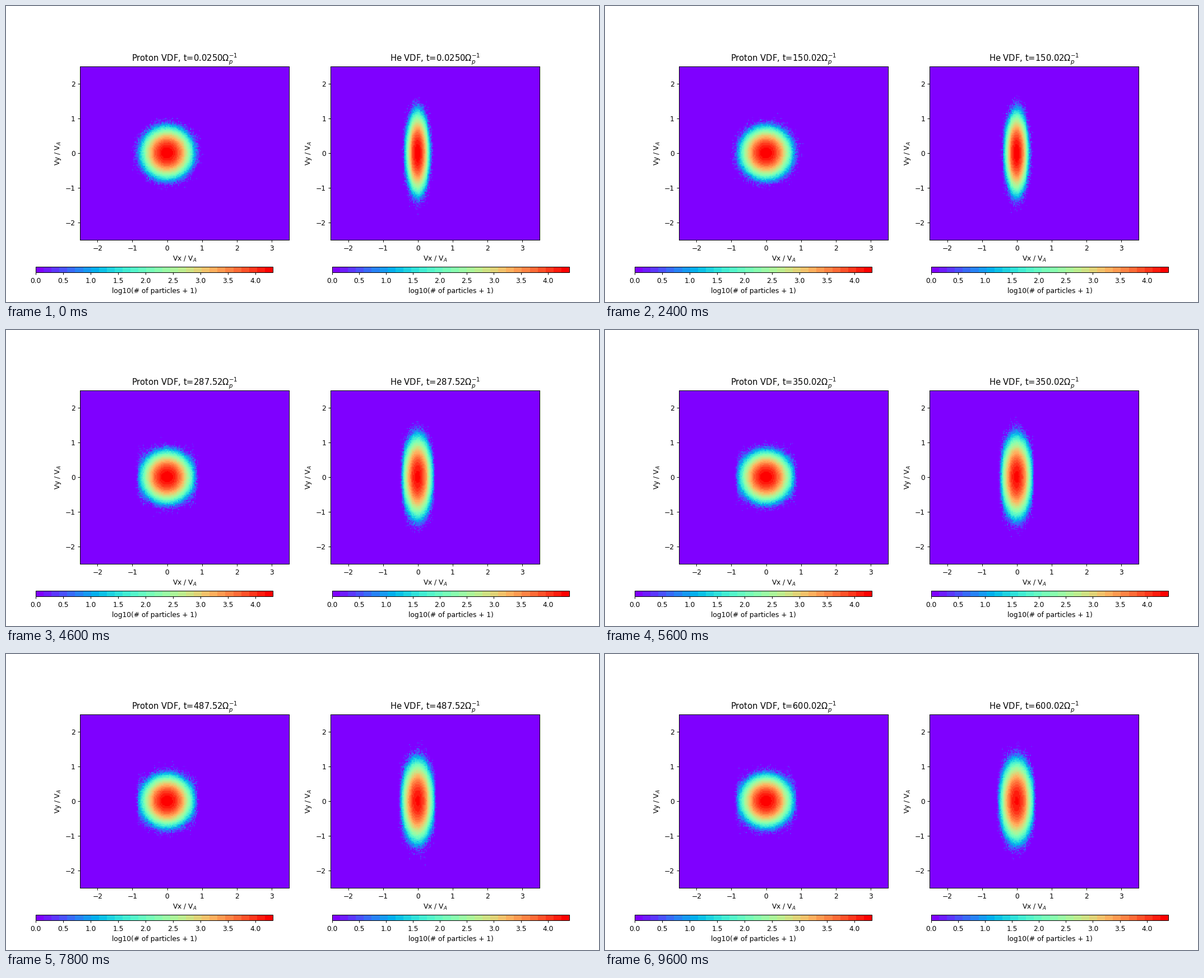
Write a matplotlib script that moves like this. It is 1058x529 px and loops after 9.8 s.

```python
import matplotlib.pyplot as plt
import numpy as np
from matplotlib.animation import FuncAnimation

plt.rcParams["font.family"] = "DejaVu Sans"

FRAMES, INTERVAL = 49, 200
BINS = 200
X_RANGE, Y_RANGE = (-2.5, 3.5), (-2.5, 2.5)


def bin_centres(limits):
    edges = np.linspace(*limits, BINS + 1)
    return (edges[1:] + edges[:-1]) / 2


VX, VY = np.meshgrid(bin_centres(X_RANGE), bin_centres(Y_RANGE))


def gauss(v, sigma):
    return np.exp(-0.5 * (v / sigma) ** 2)


def wall(v, edge):
    """Steep cut-off that flattens the sides of a distribution."""
    return np.exp(-np.abs(v / edge) ** 16)


def growth(t):
    """Saturating instability, then a slow linear drift."""
    onset = 1 / (1 + np.exp(-(t - 230) / 16))
    drift = np.clip((t - 287) / 313, 0, 1)
    return onset, drift


def proton_density(t):
    onset, drift = growth(t)
    core = 20000 * gauss(VX, 0.206) * gauss(VY, 0.206)
    edge = 1.05 - onset * (0.23 - 0.03 * drift)
    shoulder = 9 * onset * gauss(VY, 0.27) * wall(VX, 0.81)
    return core * wall(VX, edge) + shoulder * (np.abs(VX) > 0.6)


def helium_density(t):
    onset, drift = growth(t)
    sigma = 0.093 + onset * (0.027 + 0.013 * drift)
    edge = 0.47 + onset * (0.07 * drift - 0.01)
    peak = 25000 * (0.093 / sigma) ** 0.7
    return peak * gauss(VX, sigma) * wall(VX, edge) * gauss(VY, 0.325)


class Panel:
    def __init__(self, name, density, left, bar_left, vmax):
        self.name, self.density = name, density
        self.ax = fig.add_axes([left, 0.209, 0.775 / 2.2, 0.775 / 2.2 * 5 / 3])
        self.image = self.ax.imshow(
            np.zeros((BINS, BINS)), extent=(*X_RANGE, *Y_RANGE),
            origin="lower", aspect="auto", interpolation="nearest",
            cmap=plt.get_cmap("rainbow", 30), vmin=0, vmax=vmax)
        self.ax.set_xticks(range(-2, 4))
        self.ax.set_yticks(range(-2, 3))
        self.ax.set_xlabel("Vx / V$_A$")
        self.ax.set_ylabel("Vy / V$_A$")
        self.title = self.ax.set_title("")
        bar = fig.colorbar(self.image, cax=fig.add_axes([bar_left, 0.1, 0.4, 0.02]),
                           orientation="horizontal", ticks=np.arange(0, 4.1, 0.5))
        bar.set_label("log10(# of particles + 1)")

    def update(self, t, rng):
        self.image.set_data(np.log10(rng.poisson(self.density(t)) + 1))
        stamp = f"{t:.4f}"[:6]
        self.title.set_text(rf"{self.name} VDF, t={stamp}$\Omega_p^{{-1}}$")
        return self.image, self.title


fig = plt.figure(figsize=(12, 6), dpi=529 / 6, facecolor="white")
panels = [
    Panel("Proton", proton_density, 0.125, 0.05, 4.313),
    Panel("He", helium_density, 0.125 + 0.775 / 2.2 * 1.2, 0.55, 4.4),
]


def update(i):
    rng = np.random.default_rng(i)
    t = 0.025 + 12.5 * i
    return [artist for panel in panels for artist in panel.update(t, rng)]


anim = FuncAnimation(fig, update, frames=FRAMES, interval=INTERVAL,
                     repeat=True, repeat_delay=0, blit=False)
plt.show()
```
